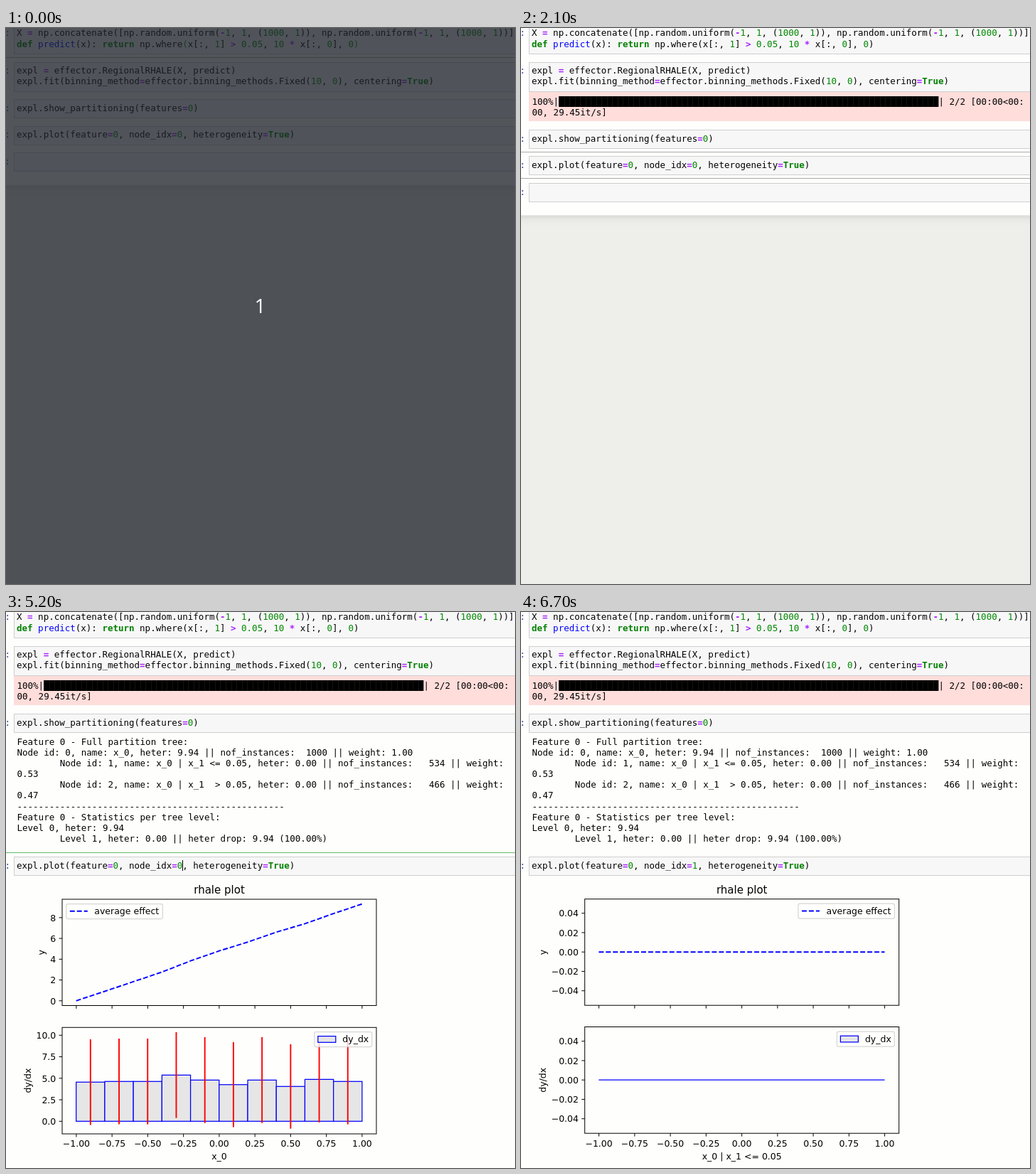
An HTML page with a canvas that plays this animation: 716 px wide and 782 px high, repeating every 8 s.

```html
<!DOCTYPE html>
<html lang="en">
<head>
<meta charset="utf-8">
<title>Notebook session</title>
<style>
html, body { margin: 0; width: 100%; height: 100%; overflow: hidden; background: #eeeeeb; }
canvas { display: block; }
</style>
</head>
<body>
<canvas id="stage" width="716" height="782"></canvas>
<script>
const W = 716, H = 782, LOOP = 8000;
const ctx = document.getElementById('stage').getContext('2d');
const MONO = '"DejaVu Sans Mono", monospace', SANS = '"DejaVu Sans", sans-serif';
const SIZE = 12.5, CHAR = 7.525, LEAD = 15.18;
const PAPER = '#fefefd', GREY = '#ababab', GREEN = '#66bb6a';

function rect(x, y, w, h, fill) {
  ctx.fillStyle = fill;
  ctx.fillRect(x, y, w, h);
}

function line(x1, y1, x2, y2, color, width = 1) {
  ctx.strokeStyle = color;
  ctx.lineWidth = width;
  ctx.beginPath();
  ctx.moveTo(x1, y1);
  ctx.lineTo(x2, y2);
  ctx.stroke();
}

function box(x, y, w, h, color, width) {
  ctx.strokeStyle = color;
  ctx.lineWidth = width;
  ctx.strokeRect(x, y, w, h);
}

function text(s, x, y, { font = SANS, size = SIZE, color = '#000', align = 'left', bold = false } = {}) {
  ctx.font = `${bold ? 'bold ' : ''}${size}px ${font}`;
  ctx.fillStyle = color;
  ctx.textAlign = align;
  ctx.fillText(s, x, y);
}

// ---- notebook ----

const WORD = /[A-Za-z_]\w*|\d[\d.]*|[=\-*>]|\s+|[^\w\s=\-*>]+/g;

function style(word) {
  if (/^(def|return|True)$/.test(word)) return { color: '#008000', bold: true };
  if (/^\d/.test(word)) return { color: '#008800' };
  if (/^[=\-*>]$/.test(word)) return { color: '#aa22ff', bold: true };
  return {};
}

function code(src, y) {
  let col = 0, last = '';
  for (const word of src.match(WORD)) {
    if (word.trim()) {
      const look = last === 'def' ? { color: '#0000ff' } : style(word);
      text(word, 15 + col * CHAR, y, { font: MONO, ...look });
      last = word;
    }
    col += word.length;
  }
}

function cell(y, height, lines) {
  const top = Math.round(y), base = y + 16.7;
  rect(11, top, W, height, '#cfcfcf');
  rect(12, top + 1, W, height - 2, '#f7f7f7');
  text(':', -1.6, Math.round(base), { font: MONO, color: '#303f9f' });
  lines.forEach((s, i) => code(s, Math.round(base + i * LEAD)));
}

function select(top, bottom, color = GREY) {
  if (top !== null) rect(0, top, W, 1, color);
  if (bottom !== null) rect(0, bottom, W, 1, color);
}

function output(lines, y) {
  lines.forEach((s, i) => text(s, 15.5, Math.round(y + i * LEAD), { font: MONO }));
}

function progress() {
  rect(11, 90, W, 41, '#feddda');
  output(['100%|', '00, 29.45it/s]'], 108);
  const x = 15.5 + 5 * CHAR, count = 71;
  rect(x, 96, count * CHAR, 15, '#000');
  for (let i = 1; i < count; i++) rect(Math.round(x + i * CHAR), 96, 1, 15, '#161310');
  text('| 2/2 [00:00<00:', x + count * CHAR, 108, { font: MONO });
}

const TREE = [
  'Feature 0 - Full partition tree:',
  'Node id: 0, name: x_0, heter: 9.94 || nof_instances:  1000 || weight: 1.00',
  '        Node id: 1, name: x_0 | x_1 <= 0.05, heter: 0.00 || nof_instances:   534 || weight:',
  '0.53',
  '        Node id: 2, name: x_0 | x_1  > 0.05, heter: 0.00 || nof_instances:   466 || weight:',
  '0.47',
  '-'.repeat(50),
  'Feature 0 - Statistics per tree level:',
  'Level 0, heter: 9.94',
  '        Level 1, heter: 0.00 || heter drop: 9.94 (100.00%)'
];

// ---- charts ----

const TICK_STEP = 50.25;
const num = (v, d) => v.toFixed(d).replace('-', '\u2212');

function axes(x, y, h, ticks, zero, unit, digits, label, labelX) {
  for (const v of ticks) {
    const ty = zero - v * unit;
    line(x - 4.4, ty, x, ty, '#000');
    text(num(v, digits), x - 8.7, ty + 4.7, { align: 'right' });
  }
  for (let i = 0; i <= 8; i++) {
    const tx = x + 19.9 + i * TICK_STEP;
    line(tx, y + h, tx, y + h + 4.4, '#000');
  }
  box(x, y, 442, h, '#000', 1);
  ctx.save();
  ctx.translate(labelX, y + h / 2);
  ctx.rotate(-Math.PI / 2);
  text(label, 0, 0, { align: 'center' });
  ctx.restore();
}

function dashes(points) {
  ctx.setLineDash([6.94, 3]);
  ctx.strokeStyle = '#00f';
  ctx.lineWidth = 1.9;
  ctx.beginPath();
  points.forEach(([x, y]) => ctx.lineTo(x, y));
  ctx.stroke();
  ctx.setLineDash([]);
}

function legend(x, y, w, label, dashed) {
  ctx.beginPath();
  ctx.roundRect(x, y, w, 21, 2.5);
  ctx.fillStyle = 'rgba(255,255,255,.8)';
  ctx.fill();
  ctx.strokeStyle = 'rgba(204,204,204,.8)';
  ctx.lineWidth = 1.25;
  ctx.stroke();
  if (dashed) {
    dashes([[x + 5, y + 10.3], [x + 30, y + 10.3]]);
  } else {
    rect(x + 5, y + 6, 25, 8.7, '#e6e6e6');
    box(x + 5, y + 6, 25, 8.7, '#00f', 1.25);
  }
  text(label, x + 39.5, y + 14.7);
}

function captions(x, label) {
  text('rhale plot', x + 221, 396, { size: 15, align: 'center' });
  for (let i = 0; i <= 8; i++)
    text(num(i / 4 - 1, 2), x + 19.9 + i * TICK_STEP, 752, { align: 'center' });
  text(label, x + 221, 769.5, { align: 'center' });
}

const SLOPES = [4.55, 4.63, 4.63, 5.37, 4.79, 4.26, 4.79, 4.05, 4.87, 4.63];

function fullPlot() {
  const x = 79, x0 = 98.7, bin = 40.22, base = 546.8, scale = 14.62, zero = 716.3, unit = 12.1;
  let sum = 0;
  const curve = [[x0, base]];
  SLOPES.forEach((s, i) => {
    sum += s * 0.2;
    curve.push([x0 + (i + 1) * bin, base - sum * scale]);
    const bar = [x0 + i * bin, zero - s * unit, bin, s * unit];
    rect(...bar, '#e6e6e6');
    box(...bar, '#00f', 1.25);
  });
  SLOPES.forEach((s, i) => {
    const p = s / 10, dev = 10 * Math.sqrt(p * (1 - p)), mid = x0 + (i + 0.5) * bin;
    line(mid, zero - (s + dev) * unit, mid, zero - (s - dev) * unit, '#f00', 1.9);
  });
  dashes(curve);
  axes(x, 404, 149.5, [0, 2, 4, 6, 8], base, scale, 0, 'y', 54);
  axes(x, 584.3, 149.7, [0, 2.5, 5, 7.5, 10], zero, unit, 1, 'dy/dx', 34.5);
  legend(84.8, 410.5, 135.5, 'average effect', true);
  legend(433.8, 590.6, 81, 'dy_dx', false);
  captions(x, 'x_0');
}

function flatPlot() {
  const x = 89.7, ticks = [-0.04, -0.02, 0, 0.02, 0.04], base = 478.2, zero = 658.2, unit = 1363;
  dashes([[x + 19.7, base], [x + 421.9, base]]);
  line(x + 19.7, zero, x + 421.9, zero, '#00f', 1.25);
  axes(x, 403.7, 149.5, ticks, base, unit, 2, 'y', 34.5);
  axes(x, 583.5, 149.7, ticks, zero, unit, 2, 'dy/dx', 34.5);
  legend(390, 410.2, 135.5, 'average effect', true);
  legend(444.4, 590.2, 81, 'dy_dx', false);
  captions(x, 'x_0 | x_1 <= 0.05');
}

// ---- timeline ----

function page(end) {
  rect(0, 0, W, H, '#eeeeeb');
  ctx.save();
  ctx.shadowColor = 'rgba(87,87,87,.25)';
  ctx.shadowBlur = 12;
  rect(-20, -20, W + 40, end + 20, PAPER);
  ctx.restore();
}

function selection(t) {
  if (t < 400) select(null, 41);
  else if (t < 1100) select(42, 94);
  else if (t < 1200) select(94, 132);
  else if (t < 2100) select(137, 174);
  else if (t < 2200) select(174, 211);
  else if (t < 3400) select(338, 376);
  else if (t < 3600) select(376, 412);
  else if (t >= 5200 && t < 6400) select(338, null, GREEN);
  else if (t >= 6400 && t < 6700) select(376, 412);
}

function caret(t) {
  if (t < 5200 || t >= 6400 || (t >= 5700 && t < 5900)) return;
  rect(t >= 5900 && t < 6100 ? 241 : 248, 349, 1, 15, '#000');
}

function brackets() {
  for (const [mark, col] of [['(', 31], [')', 63]]) {
    rect(15 + col * CHAR, 16, CHAR, 15, '#f7f7f7');
    text(mark, 15 + col * CHAR, 27, { font: MONO, color: '#00aa00' });
  }
}

function countdown() {
  rect(0, 0, W, H, 'rgba(31,36,44,.77)');
  text('1', 357.5, 401, { font: '"Open Sans", sans-serif', size: 28, color: '#fff', align: 'center' });
}

function draw(t) {
  const fitted = t >= 1200, listed = t >= 2200;
  const plotted = (t >= 3600 && t < 6400) || t >= 6700;
  const third = fitted ? 142.9 : 100.2;
  const fourth = listed ? 344.4 : fitted ? 180.4 : 137.7;
  const fifth = listed ? 381.4 : fitted ? 217.9 : 175.2;
  const node = t < 5900 ? '0' : t < 6100 ? '' : '1';

  page(plotted ? H + 40 : listed ? 427 : fitted ? 263.5 : 221.5);
  cell(-5.3, 42, [
    'X = np.concatenate([np.random.uniform(-1, 1, (1000, 1)), np.random.uniform(-1, 1, (1000, 1))]',
    'def predict(x): return np.where(x[:, 1] > 0.05, 10 * x[:, 0], 0)'
  ]);
  if (t < 400) brackets();
  cell(47.5, 42, [
    'expl = effector.RegionalRHALE(X, predict)',
    'expl.fit(binning_method=effector.binning_methods.Fixed(10, 0), centering=True)'
  ]);
  if (fitted) progress();
  cell(third, 27, ['expl.show_partitioning(features=0)']);
  if (listed) output(TREE, 186.53);
  cell(fourth, 27, [`expl.plot(feature=0, node_idx=${node}, heterogeneity=True)`]);
  if (plotted) (t < 6400 ? fullPlot : flatPlot)();
  else cell(fifth, 27, []);
  selection(t);
  caret(t);
  if (t < 100) countdown();
}

const start = performance.now();
function tick() {
  draw((performance.now() - start) % LOOP);
  requestAnimationFrame(tick);
}
tick();
</script>
</body>
</html>
```
